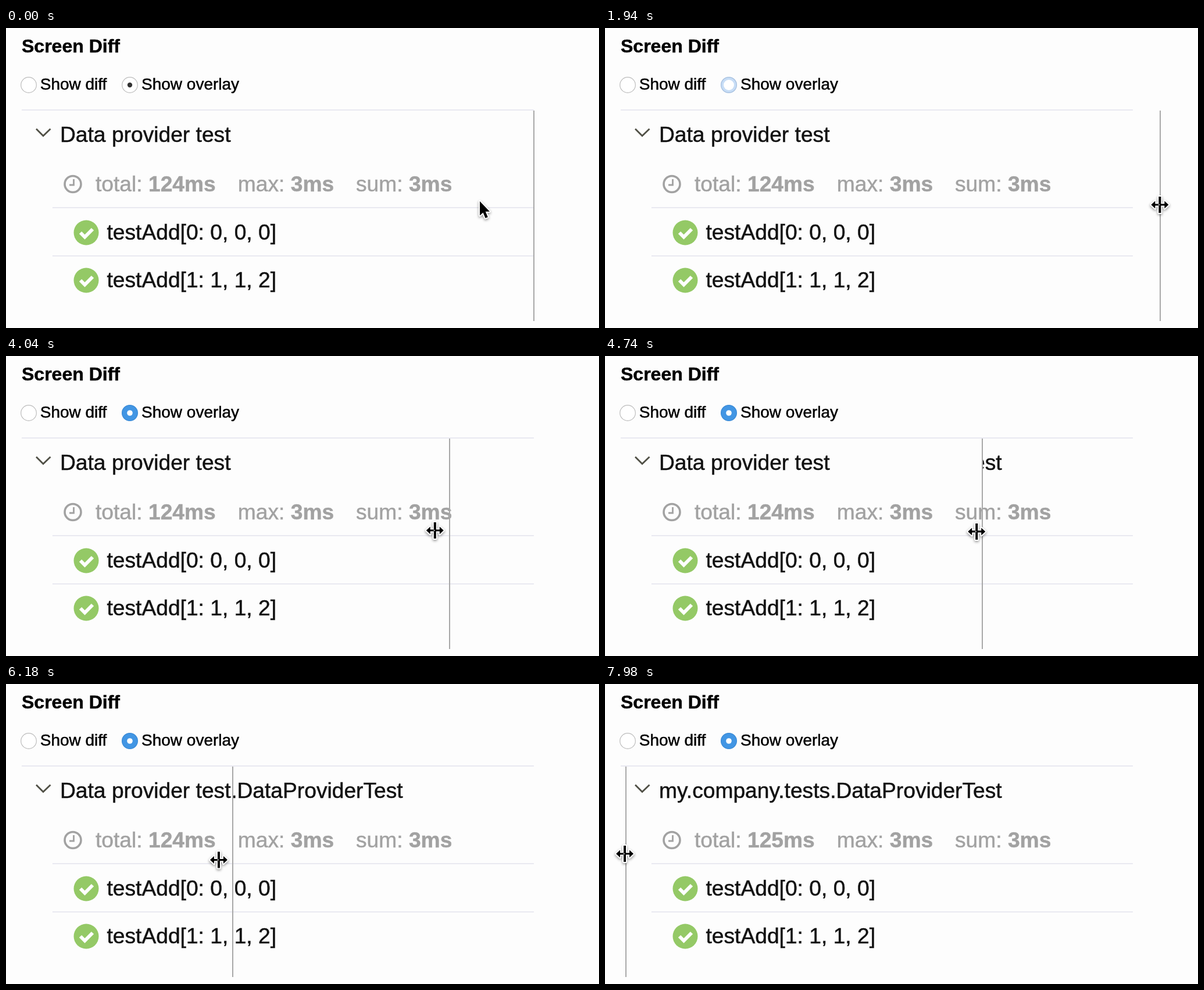
Recreate the animation shown at these times as an HTML page with a canvas. Size 1020 px wide and 516 px high, loop 8 s.

```html
<!DOCTYPE html>
<html lang="en">
<head>
<meta charset="utf-8">
<title>Screen Diff</title>
<style>
  html, body { margin: 0; width: 100%; height: 100%; overflow: hidden; background: #fdfdfd; }
  canvas { display: block; }
</style>
</head>
<body>
<canvas id="stage" width="1020" height="516"></canvas>
<script>
const W = 1020, H = 516, LOOP = 8000;
const CLICK = 1900;   // window gains focus, slider starts to follow
const LAG = 80;       // slider trails the pointer
const BG = '#fdfdfd', INK = '#111', GRAY = '#a2a2a2', RULE = '#e9e9f1', GREEN = '#94c966';
const SIZE = 37.2;
const FONT = '"Liberation Sans", Arial, sans-serif';
const ctx = document.getElementById('stage').getContext('2d');

// pointer stops: time, x, y
const stops = [
  [0, 815, 298], [800, 982, 305], [1800, 954, 304], [2450, 957, 304],
  [3240, 882, 300], [3960, 763, 300], [4040, 738, 300],
  [5480, 541, 304], [7160, 121, 298], [7980, 34, 292]
];

// monotone cubic through one column of the stops, at rest at both ends
function curve(keys, col) {
  const slope = i => (keys[i + 1][col] - keys[i][col]) / (keys[i + 1][0] - keys[i][0]);
  const tangents = keys.map((_, i) => {
    if (i === 0 || i === keys.length - 1) return 0;
    const a = slope(i - 1), b = slope(i);
    return a * b > 0 ? 2 * a * b / (a + b) : 0;
  });
  return t => {
    const next = keys.findIndex(k => k[0] > t);
    if (next < 0) return keys[keys.length - 1][col];
    const i = next - 1;
    const h = keys[next][0] - keys[i][0], u = (t - keys[i][0]) / h, w = 1 - u;
    return w * w * (1 + 2 * u) * keys[i][col] + u * u * (3 - 2 * u) * keys[next][col] +
      h * u * w * (w * tangents[i] - u * tangents[next]);
  };
}
const pointerX = curve(stops, 1), pointerY = curve(stops, 2);

// a thin outline gives the slightly heavier strokes of the page text
function text(c, str, x, y, size, color = '#000', weight = 'normal') {
  c.font = `${weight} ${size}px ${FONT}`;
  c.fillStyle = c.strokeStyle = color;
  c.lineWidth = 0.5;
  c.fillText(str, x, y);
  c.strokeText(str, x, y);
}

function line(c, points, color, width) {
  c.beginPath();
  points.forEach(([x, y]) => c.lineTo(x, y));
  c.strokeStyle = color;
  c.lineWidth = width;
  c.stroke();
}

function disc(c, x, y, r, fill, stroke, width = 1.2) {
  c.beginPath();
  c.arc(x, y, r, 0, Math.PI * 2);
  if (fill) { c.fillStyle = fill; c.fill(); }
  if (stroke) { c.strokeStyle = stroke; c.lineWidth = width; c.stroke(); }
}

function stat(c, label, value, x) {
  text(c, label + ' ', x, 281, SIZE, GRAY);
  const width = c.measureText(label + ' ').width;
  text(c, value, x + width, 281, SIZE, GRAY, 'bold');
}

function testRow(c, label, y) {
  disc(c, 138, y, 21.5, GREEN);
  line(c, [[128, y], [135.5, y + 7.5], [149, y - 6]], '#fff', 6);
  text(c, label, 173.5, y + 12, SIZE, INK);
}

// one screenshot of the report
function report(title, total) {
  const layer = document.createElement('canvas');
  layer.width = W;
  layer.height = H;
  const c = layer.getContext('2d');
  c.fillStyle = BG;
  c.fillRect(0, 0, W, H);
  c.filter = 'blur(0.5px)';

  c.fillStyle = RULE;
  c.fillRect(27, 140, 881, 2);
  c.fillRect(80, 308, 828, 2);
  c.fillRect(80, 391, 828, 2);

  line(c, [[52, 173.5], [64, 185.5], [76.5, 173.5]], '#505046', 2.8);
  text(c, title, 93, 196, SIZE, INK);

  disc(c, 115, 268.5, 14, null, GRAY, 3.6);
  line(c, [[116.5, 260], [116.5, 270], [109, 270]], GRAY, 2.8);
  stat(c, 'total:', total, 154);
  stat(c, 'max:', '3ms', 398.8);
  stat(c, 'sum:', '3ms', 602);

  testRow(c, 'testAdd[0: 0, 0, 0]', 352);
  testRow(c, 'testAdd[1: 1, 1, 2]', 434);
  return layer;
}
const before = report('Data provider test', '124ms');
const after = report('my.company.tests.DataProviderTest', '125ms');

function mix(a, b, k) {
  return `rgb(${a.map((v, i) => Math.round(v + (b[i] - v) * k))})`;
}

function header(t) {
  text(ctx, 'Screen Diff', 27, 42, 32, '#000', 'bold');
  text(ctx, 'Show diff', 58.7, 106, 28);
  text(ctx, 'Show overlay', 233, 106, 28);
  disc(ctx, 39, 98, 13.3, '#fff', '#bcbcbc');
  if (t < CLICK) {
    disc(ctx, 213, 98, 13.3, '#fff', '#bcbcbc');
    disc(ctx, 213, 98, 4.2, '#333');
  } else {
    // the blue fill grows inwards until a small dot is left
    const k = Math.min(1, Math.max(0, (t - CLICK - 40) / 160));
    disc(ctx, 213, 98, 13.4, mix([200, 221, 246], [66, 150, 228], k),
      mix([165, 190, 222], [58, 138, 214], k));
    disc(ctx, 213, 98, 9 - 4.2 * k, '#fff');
  }
}

const arrow = [[0, 0], [0, 24.5], [5.6, 19.4], [9.6, 29], [13.8, 27.2], [9.8, 17.8], [17, 17.8]];
const arm = [[2, -1.6], [8, -1.6], [8, -6.5], [15, 0], [8, 6.5], [8, 1.6], [2, 1.6]];
const bar = [[-2, -14], [2, -14], [2, 14], [-2, 14]];
const resize = [bar, arm, arm.map(([x, y]) => [-x, y])];

function cursor(shapes, x, y) {
  const path = new Path2D();
  for (const pts of shapes) {
    pts.forEach(([px, py]) => path.lineTo(px, py));
    path.closePath();
    path.moveTo(0, 0);
  }
  ctx.save();
  ctx.translate(x, y);
  ctx.lineJoin = 'round';
  ctx.lineWidth = 4;
  ctx.strokeStyle = '#fff';
  ctx.shadowColor = 'rgba(0,0,0,0.4)';
  ctx.shadowBlur = 4;
  ctx.shadowOffsetY = 2;
  ctx.stroke(path);
  ctx.shadowColor = 'transparent';
  ctx.fillStyle = '#000';
  ctx.fill(path);
  ctx.restore();
}

function draw(t) {
  const focused = t >= CLICK;
  const split = focused ? Math.ceil(pointerX(t - LAG)) : 908;
  ctx.drawImage(after, 0, 0);
  ctx.drawImage(before, 0, 0, split, H, 0, 0, split, H);
  header(t);
  ctx.fillStyle = '#a8a8a8';
  ctx.fillRect(split - 1, 142, 2, 362);
  cursor(focused ? resize : [arrow], pointerX(t), pointerY(t));
}

const start = performance.now();
function tick() {
  draw((performance.now() - start) % LOOP);
  requestAnimationFrame(tick);
}
tick();
</script>
</body>
</html>
```
